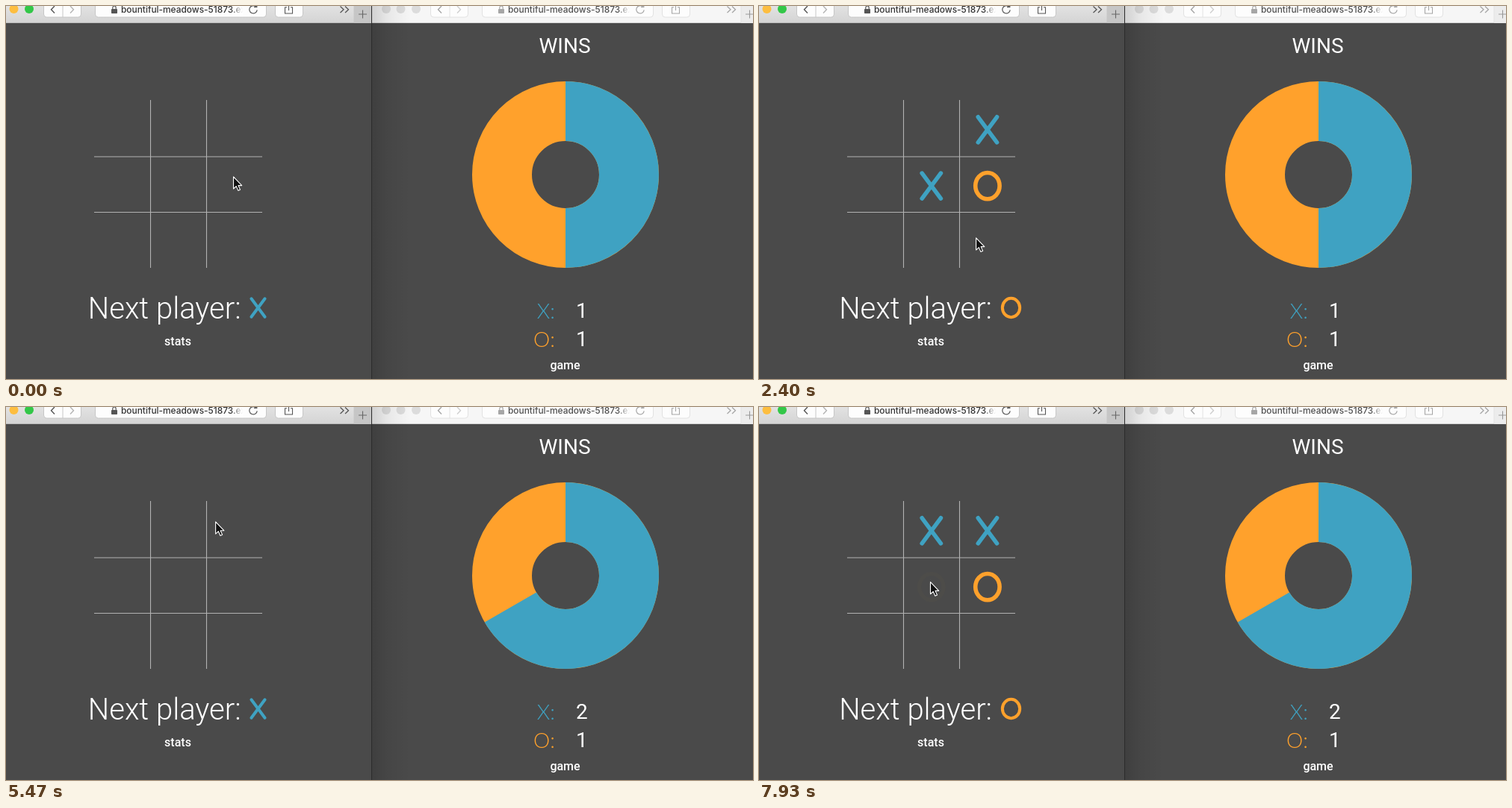
Animation, 1000 px wide and 500 px high, one loop 8000 ms. Source, as an HTML page:

```html
<!DOCTYPE html>
<html lang="en">
<head>
<meta charset="utf-8">
<title>Tic-tac-toe with stats</title>
<style>
html, body { margin: 0; width: 100%; height: 100%; overflow: hidden; background: #4a4a4a; }
svg { display: block; width: 1000px; height: 500px; font-family: Roboto, sans-serif; }
.url { font: 500 11.9px Inter, sans-serif; }
.big { font-size: 40px; font-weight: 300; }
.mid { font-size: 28px; }
.label { font: 300 28px Lato, sans-serif; text-anchor: end; }
.link { font-size: 16px; font-weight: 500; text-anchor: middle; }
.soft { filter: blur(.45px); }
</style>
</head>
<body>
<svg viewBox="0 0 1000 500" fill="#fff">
  <defs>
    <linearGradient id="bar" x2="0" y2="1"><stop stop-color="#e2e2e2"/><stop offset="1" stop-color="#d4d4d4"/></linearGradient>
    <linearGradient id="shade"><stop stop-color="#000" stop-opacity=".15"/><stop offset=".4" stop-color="#000" stop-opacity=".06"/><stop offset="1" stop-color="#000" stop-opacity="0"/></linearGradient>
    <linearGradient id="fade"><stop stop-color="#fff" stop-opacity="0"/><stop offset="1" stop-color="#fff"/></linearGradient>
  </defs>
  <rect width="1000" height="500" fill="#4a4a4a"/>

  <g id="rightBar"></g>
  <rect x="490" width="52" height="500" fill="url(#shade)"/>
  <g id="leftBar"></g>
  <path d="M489.5 0V500" stroke="#2b2b2b"/>

  <path d="M193.5 126V351M268.5 126V351M118 202H343M118 276.5H343" stroke="#b2b2b2" stroke-width="1.1"/>
  <g id="board"></g>
  <g id="undo">
    <path d="M222.5 85A11.3 11.3 0 1 1 221.5 98.6" fill="none" stroke="#fff" stroke-width="4.2"/>
    <path d="M217 79.5V90.5H228Z"/>
  </g>
  <text id="status" class="big" y="419"></text>
  <g id="turn"></g>
  <text class="link" x="230" y="454.5">stats</text>

  <text class="mid" x="748" y="63" text-anchor="middle">WINS</text>
  <g class="soft" fill="none" stroke-width="80">
    <circle cx="749" cy="226" r="85" stroke="#ffa12c"/>
    <path id="share" stroke="#3fa2c2"/>
  </g>
  <text class="label" x="735" y="418.5" fill="#3fa2c2">X:</text>
  <text class="label" x="735" y="457" fill="#ffa12c">O:</text>
  <text id="xWins" class="mid" x="763" y="418"></text>
  <text class="mid" x="763" y="456">1</text>
  <text class="link" x="748.5" y="487">game</text>

  <path id="cursor" d="M0 0V16.2L3.7 12.8L6.3 18.6L9 17.4L6.5 11.8H11.2Z" fill="#111" stroke="#fff" stroke-width="1.1" stroke-linejoin="round"/>
</svg>
<script>
const LOOP = 8000, FADE = 420, WIN = 3320, COUNT = 3700, RESET = 4900;
const BLUE = [63, 162, 194], ORANGE = [255, 161, 44], WHITE = [255, 255, 255];
const $ = id => document.getElementById(id);
const clamp = v => Math.max(0, Math.min(1, v));
const rgb = c => `rgb(${c.map(Math.round)})`;
const mix = (a, b, k) => a.map((v, i) => v + (b[i] - v) * k);

// time, player, cell
const moves = [
  [570, 'X', 2], [1140, 'O', 5], [1900, 'X', 4], [2680, 'O', 8], [WIN, 'X', 6],
  [5780, 'X', 2], [6550, 'O', 5], [7250, 'X', 1], [7925, 'O', 4]
];
// time, x, y of the pointer tip
const path = [
  [0, 305, 229], [380, 305, 170], [750, 306, 166], [1070, 306, 236], [1280, 303, 238],
  [1530, 248, 236], [1750, 230, 240], [2030, 230, 241], [2400, 291, 311], [2600, 304, 315],
  [2850, 303, 315], [3260, 158, 311], [3530, 157, 310], [4050, 158, 309], [4650, 228, 96],
  [5030, 230, 92], [5470, 281, 154], [5680, 304, 165], [5950, 304, 166], [6380, 305, 234],
  [6600, 303, 235], [6800, 267, 210], [7050, 232, 166], [7400, 231, 166], [7750, 230, 232],
  [8000, 230, 235]
];

function toolbar(dx, active) {
  const ink = active ? '#555' : '#a6a6a6', pale = active ? '#b4b4b4' : '#cfcfcf';
  const edge = active ? '#c6c6c6' : '#e2e2e2', dots = active ? ['#fdbe40', '#33c748'] : ['#dcdcdc', '#dcdcdc'];
  const box = (x, w) => `<rect x="${x}" y="-8" width="${w}" height="23" rx="4" fill="#fdfdfd" stroke="${edge}"/>`;
  const line = (d, c, w) => `<path d="${d}" fill="none" stroke="${c}" stroke-width="${w}"/>`;
  return `<g transform="translate(${dx} 0)">
    <rect x="${active ? 0 : -28}" width="${active ? 489 : 510}" height="22.8" fill="${active ? 'url(#bar)' : '#f6f6f6'}"/>
    <rect x="466" width="23" height="22.8" fill="${active ? '#c6c6c6' : '#ececec'}"/>
    ${active ? '' : '<circle cx="-9" cy="4" r="6" fill="#dcdcdc"/>'}
    ${dots.map((c, i) => `<circle cx="${10.5 + i * 20.5}" cy="4" r="6" fill="${c}"/>`).join('')}
    ${box(50.5, 50)}${box(119.5, 229)}${box(360.5, 37)}
    ${line('M76 0V15M466 0V22', edge, 1)}
    ${line('M65 0L60.5 4.7L65 9.5', ink, 1.4)}${line('M86 0L90.5 4.7L86 9.5', pale, 1.4)}
    <rect x="141" y="4" width="8" height="6" rx=".8" fill="${ink}"/>
    ${line('M142.8 4V2.5A2.2 2.6 0 0 1 147.2 2.5V4', ink, 1.2)}
    <text class="url" x="154" y="9" fill="${active ? '#333' : '#505050'}">bountiful-meadows-51873.ex</text>
    <rect x="301" y="0" width="16" height="14" fill="url(#fade)"/><rect x="317" y="0" width="8" height="14" fill="#fdfdfd"/>
    ${line('M335.2 1.6A5.2 5.2 0 1 0 336.2 5.4M332 1.5H335.8V-2', ink, 1.2)}
    ${line('M376 1.8H373.5V10H383.5V1.8H381M378.5 6V-4', ink, 1.1)}
    ${line('M447.5 .5L452 4.8L447.5 9M454 .5L458.5 4.8L454 9', ink, 1.3)}
    ${line('M472 11H483M477.5 5.5V16.5', active ? '#666' : '#999', 1.1)}
  </g>`;
}

function mark(kind, x, y, scale, color, opacity) {
  const shape = kind === 'X' ? '<path d="M-12.6 -17L12.6 17M12.6 -17L-12.6 17"/>' : '<ellipse rx="16.2" ry="17.6"/>';
  return `<g transform="translate(${x} ${y}) scale(${scale})" opacity="${opacity}" fill="none"
    stroke="${rgb(color)}" stroke-width="5.6" stroke-linecap="round">${shape}</g>`;
}

// Cubic through the points, flat wherever an axis turns
function along(t, axis) {
  let i = 0;
  while (i < path.length - 2 && path[i + 1][0] <= t) i++;
  const slope = k => {
    if (k < 1 || k > path.length - 2) return 0;
    const rate = j => (path[j + 1][axis] - path[j][axis]) / (path[j + 1][0] - path[j][0]);
    const a = rate(k - 1), b = rate(k);
    return a * b <= 0 ? 0 : 2 * a * b / (a + b);
  };
  const p = path[i], q = path[i + 1], h = q[0] - p[0], u = (t - p[0]) / h, v = 1 - u;
  return p[axis] * v * v * (1 + 2 * u) + q[axis] * u * u * (1 + 2 * v)
    + h * u * v * (slope(i) * v - slope(i + 1) * u);
}

function draw(t) {
  const done = moves.filter(m => m[0] <= t);
  const won = t >= WIN && t < RESET;
  $('board').innerHTML = done.map(([at, kind, cell]) => {
    const first = at < RESET;
    const wins = first && kind === 'X';
    let color = kind === 'X' ? BLUE : ORANGE;
    if (wins) color = at === WIN ? WHITE : mix(BLUE, WHITE, clamp((t - WIN) / FADE));
    const gone = first ? clamp((t - RESET) / 300) : 0;
    const shown = clamp((t - at) / FADE) * (1 - gone);
    return shown ? mark(kind, 155.7 + cell % 3 * 75.1, 165.8 + Math.floor(cell / 3) * 75.3, 1, color, shown) : '';
  }).join('');

  const game = done.filter(m => t < RESET || m[0] > RESET);
  // The label follows once the new mark begins to show
  const turn = won || game.filter(m => t - m[0] > 20).length % 2 === 0 ? 'X' : 'O';
  $('status').textContent = won ? 'Winner:' : 'Next player:';
  $('status').setAttribute('x', won ? 147.5 : turn === 'X' ? 109.8 : 107.2);
  $('turn').innerHTML = mark(turn, won ? 301 : 337.5, 404.5, .72, turn === 'X' ? BLUE : ORANGE, 1);
  $('undo').style.display = won ? '' : 'none';

  const wins = t < COUNT ? 1 : 2, angle = 2 * Math.PI * wins / (wins + 1);
  $('xWins').textContent = wins;
  $('share').setAttribute('d', `M749 141A85 85 0 ${wins > 1 ? 1 : 0} 1 ${749 + 85 * Math.sin(angle)} ${226 - 85 * Math.cos(angle)}`);
  $('cursor').setAttribute('transform', `translate(${along(t, 1) - .5} ${along(t, 2) - .2})`);
}

$('leftBar').innerHTML = toolbar(0, true);
$('rightBar').innerHTML = toolbar(518, false);
const start = performance.now();
function tick() {
  draw((performance.now() - start) % LOOP);
  requestAnimationFrame(tick);
}
tick();
</script>
</body>
</html>
```
